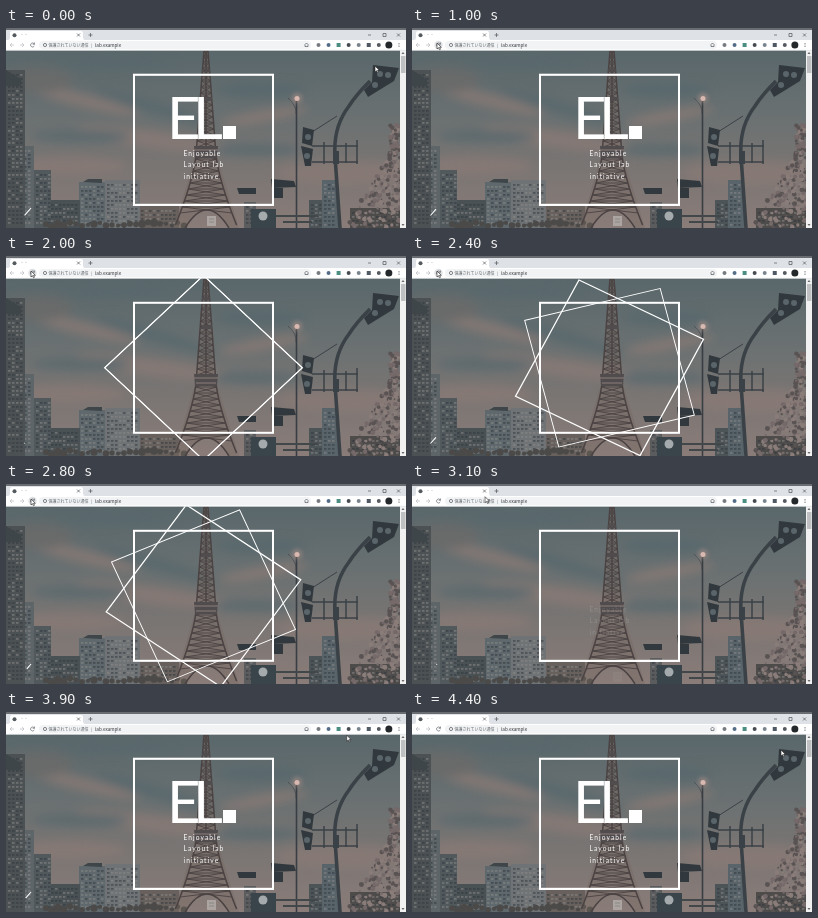
Recreate the animation shown at these times as an HTML page. Size 400x200 px, loop 4.5 s.

```html
<!DOCTYPE html>
<html lang="ja">
<head>
<meta charset="utf-8">
<title>Layout lab</title>
<style>
html, body { margin: 0; width: 100%; height: 100%; overflow: hidden; background: #6c7475; }
svg { display: block; width: 400px; height: 200px; }
.ui { font-family: "Noto Sans CJK JP", "Noto Sans", sans-serif; }
.title { font-family: Lato, "Open Sans", sans-serif; fill: #fff; }
</style>
</head>
<body>
<svg viewBox="0 0 400 200" xmlns="http://www.w3.org/2000/svg">
  <defs>
    <linearGradient id="sky" x1="0" y1="0" x2="0" y2="1">
      <stop offset="0" stop-color="#59676b"/>
      <stop offset=".35" stop-color="#697071"/>
      <stop offset=".65" stop-color="#797573"/>
      <stop offset="1" stop-color="#8a7c78"/>
    </linearGradient>
    <filter id="soft" x="-30%" y="-100%" width="160%" height="300%"><feGaussianBlur stdDeviation="5"/></filter>
    <filter id="glow" x="-100%" y="-100%" width="300%" height="300%"><feGaussianBlur stdDeviation="2"/></filter>
    <clipPath id="view"><rect y="22" width="394" height="178"/></clipPath>
  </defs>

  <g clip-path="url(#view)">
    <rect y="22" width="394" height="178" fill="url(#sky)"/>
    <g filter="url(#soft)" fill="#8a7a76" opacity=".75">
      <ellipse cx="75" cy="72" rx="60" ry="7" transform="rotate(14 75 72)"/>
      <ellipse cx="150" cy="112" rx="80" ry="9" transform="rotate(8 150 112)"/>
      <ellipse cx="258" cy="88" rx="45" ry="6" transform="rotate(-10 258 88)"/>
      <ellipse cx="60" cy="138" rx="60" ry="9"/>
      <ellipse cx="340" cy="145" rx="70" ry="12"/>
      <g fill="#56686d">
        <ellipse cx="150" cy="80" rx="65" ry="7" transform="rotate(16 150 80)"/>
        <ellipse cx="255" cy="62" rx="45" ry="8"/>
        <ellipse cx="75" cy="108" rx="50" ry="6"/>
        <ellipse cx="250" cy="122" rx="45" ry="6"/>
        <ellipse cx="110" cy="36" rx="60" ry="4"/>
      </g>
      <ellipse cx="30" cy="52" rx="38" ry="13" fill="#6c6a69"/>
    </g>
    <g id="city"></g>
    <g id="tower" fill="none" stroke="#4b4343"></g>

    <!-- street lamp -->
    <g fill="none" stroke="#383e43">
      <path d="M290.500 72V200" stroke-width="1.600"/>
      <path d="M290 86Q291 78 282 70" stroke-width=".6"/>
    </g>
    <circle cx="291" cy="70" r="5" fill="#b8958d" opacity=".5" filter="url(#glow)"/>
    <circle cx="291" cy="70.500" r="2.500" fill="#d9b8af"/>

    <g id="trees"></g>

    <!-- traffic lights -->
    <g fill="none" stroke="#3b4247">
      <path d="M334 200L329 128Q327 99 343 78Q350 67 364 53" stroke-width="3.600"/>
      <path d="M306 118H352M306 134H352M351 112V136M318 114V136M340 115V135" stroke-width="1.500"/>
      <path d="M306 104L331 88" stroke-width="1"/>
      <path d="M330 123V136" stroke-width="6"/>
    </g>
    <g fill="#32393e">
      <path d="M297 99L308 102L306 118L296 115Z"/>
      <path d="M295 118L307 121L305 138L299 138Z"/>
      <path d="M367 37L393 40L388 53L362 69L358 62L366 54Z"/>
      <path d="M231 160H250V166H233ZM265 151L288 153L290 159L266 160ZM267 160H277V170H267Z"/>
    </g>
    <g fill="#59656a">
      <circle cx="302" cy="109" r="3"/><circle cx="301" cy="128" r="3"/>
      <circle cx="374" cy="46" r="3"/><circle cx="382" cy="47" r="3"/><circle cx="369" cy="57" r="3"/>
    </g>
    <rect x="245" y="181" width="25" height="19" fill="#39444b"/>
    <circle cx="257" cy="188" r="4.500" fill="#a5aaac"/>
    <path d="M270 188H312M277 194H306" stroke="#42474a" stroke-width="2"/>

    <!-- hero -->
    <g fill="none" stroke="#fff">
      <rect x="128" y="46.800" width="139" height="130" stroke-width="2"/>
      <g transform="translate(197.500 111.800) scale(1.070 1)">
        <rect id="outer" x="-65.300" y="-65.300" width="130.600" height="130.600" stroke-width="1.200"/>
        <rect id="inner" x="-65.300" y="-65.300" width="130.600" height="130.600" stroke-width=".9"/>
      </g>
      <path id="dash" stroke-width="1.100"/>
    </g>
    <g id="letters" class="title">
      <text x="161" y="111" font-size="58">E</text>
      <text x="187" y="111" font-size="58">L</text>
      <rect x="217" y="98" width="13" height="13"/>
    </g>
    <g id="tagline" class="title" font-size="6.600" letter-spacing="1.100">
      <text x="177.500" y="127.500">Enjoyable</text>
      <text x="177.500" y="139">Layout lab</text>
      <text x="177.500" y="150.500">initiative</text>
    </g>
    <g id="scroll">
      <rect x="201" y="188" width="9" height="10" fill="#b9b2ae" opacity=".75"/>
      <path d="M203 191H208M203 194H208" stroke="#82807e" stroke-width=".8"/>
    </g>
  </g>

  <!-- browser -->
  <rect x="394" y="22" width="6" height="178" fill="#f1f1f1"/>
  <rect x="395" y="28" width="4.500" height="17" fill="#bfc0c1"/>
  <path d="M395.500 26L397 24L398.500 26ZM395.500 196L397 198L398.500 196Z" fill="#666"/>
  <rect width="400" height="12" fill="#dee1e6"/>
  <rect width="400" height="2" fill="#696c70"/>
  <path d="M2 12Q4 12 4 9V5Q4 3 6 3H75Q77 3 77 5V9Q77 12 79 12Z" fill="#fff"/>
  <rect y="12" width="400" height="10.500" fill="#fff"/>
  <path d="M0 22.300H400" stroke="#d5d7da" stroke-width=".6"/>
  <rect x="33" y="13" width="272" height="8" rx="4" fill="#f1f3f4"/>
  <circle cx="8.500" cy="7.300" r="2" fill="#555a5f"/>
  <g class="ui" font-size="4" fill="#5f6368">
    <text x="14" y="8.500">・・</text>
    <text x="42.500" y="18.800">保護されていない通信</text>
    <text x="85" y="18.800">|</text>
    <text x="89" y="18.900" font-size="4.600" fill="#303338">lab.example</text>
  </g>
  <g fill="none" stroke="#54585c" stroke-width=".7">
    <path d="M71 5.500L74 8.500M74 5.500L71 8.500M82.500 7H86.500M84.500 5V9"/>
    <path d="M362 7H365M377 5.500H380V8.500H377ZM391 5.500L394 8.500M394 5.500L391 8.500"/>
    <path d="M8 17H4M6 15L4 17L6 19M14 17H18M16 15L18 17L16 19" stroke="#b9bcc0"/>
    <circle cx="39" cy="17" r="1.600"/>
    <path d="M299 18.500V16.500L300.500 15L302 16.500V18.500Z"/>
  </g>
  <circle id="hover" cx="26.500" cy="17" r="4.200" fill="#dfe1e4"/>
  <path id="reload" d="M28.300 16A2 2 0 1 0 28.300 18M28.500 14.500V16.300H26.700" fill="none" stroke="#777b80" stroke-width=".8"/>
  <path id="stop" d="M25 15.500L28 18.500M28 15.500L25 18.500" stroke="#55595e" stroke-width=".8"/>
  <g id="tools"></g>
  <path id="cursor" d="M0 0V6L1.500 4.700L2.500 6.800L3.500 6.300L2.500 4.300H4.300Z" fill="#fff" stroke="#222" stroke-width=".6"/>
</svg>

<script>
const LOOP = 4.5, RELOADED = 1.9;
const $ = id => document.getElementById(id);
const clamp = v => Math.max(0, Math.min(1, v));
const ramp = (t, from, to) => clamp((t - from) / (to - from));
const easeInOut = p => (1 - Math.cos(Math.PI * p)) / 2;
const show = (id, opacity) => $(id).setAttribute('opacity', opacity);

let seed = 7;
const random = () => (seed = seed * 16807 % 2147483647) / 2147483647;

function drawCity() {
  // x, top, width, wall colour
  const blocks = [
    [303, 172, 14, '#4c5458'], [316, 152, 16, '#58646a'], [238, 174, 12, '#5b5c5e'],
    [133, 178, 40, '#67605d'], [73, 154, 27, '#5f686c'], [99, 152, 35, '#6f7375'],
    [43, 172, 31, '#4a5154'], [28, 142, 17, '#51595d'], [16, 118, 12, '#5e6568'],
    [0, 42, 19, '#4c5154'], [344, 180, 50, '#4e4b4b']
  ];
  let out = '';
  for (const [x, top, width, wall] of blocks) {
    out += `<rect x="${x}" y="${top}" width="${width}" height="${200 - top}" fill="${wall}"/>`;
    for (let y = top + 4; y < 198; y += 4)
      for (let wx = x + 2; wx < x + width - 2; wx += 4)
        out += `<rect x="${wx}" y="${y}" width="2.500" height="1.800" fill="${random() < .6 ? '#32393e' : '#8a8987'}" opacity=".55"/>`;
  }
  out += '<path d="M0 58V42L15 51V58ZM77 154L82 151H96V155Z" fill="#3f464a"/>';
  for (let i = 0; i < 24; i++)
    out += `<circle cx="${40 + i * 6}" cy="${199 - random() * 5}" r="${2 + random() * 2}" fill="#4b4a48"/>`;
  $('city').innerHTML = out;
}

function drawTower() {
  const half = y => y < 50 ? 2 + (y - 23) * .08 : y < 125 ? 4.2 + (y - 50) * .075 : 9.8 + 22 * ((y - 125) / 75) ** 1.4;
  let left = '', right = '', lattice = '';
  for (let y = 23; y <= 200; y += 6) {
    const a = half(y), b = half(y + 6);
    left += `${left ? 'L' : 'M'}${200 - a} ${y}`;
    right += `${right ? 'L' : 'M'}${200 + a} ${y}`;
    if (y < 180)
      lattice += `M${200 - a} ${y}L${200 + b} ${y + 6}M${200 + a} ${y}L${200 - b} ${y + 6}M${200 - a} ${y}H${200 + a}`;
  }
  $('tower').innerHTML = `
    <path d="M198 23H202L204 50L210 125L233 200H222Q201 164 180 200H168L190 125L196 50Z" fill="#75675f" stroke="none" opacity=".4"/>
    <path d="${lattice}" stroke-width=".9"/>
    <path d="${left}${right}" stroke-width="1.500"/>
    <path d="M200 23V118" stroke-width="1.500"/>
    <path d="M188 118H212L211 130H189ZM195 69H206V73H195ZM196 41H204V44H196Z" fill="#504b4c" stroke="none"/>
    <path d="M188 122H212M190 127H210" stroke="#8a7f7a"/>
    <path d="M179 200Q201 164 223 200" stroke-width="1.500"/>`;
}

function drawTrees() {
  const leaves = ['#595353', '#75696a', '#8a7d79'];
  let out = '';
  for (let i = 0; i < 260; i++) {
    const y = 97 + random() * 103, spread = 10 + Math.max(0, y - 125) * .6;
    out += `<circle cx="${394 - random() * spread}" cy="${y}" r="${.8 + random() * 1.7}" fill="${leaves[i % 3]}"/>`;
  }
  $('trees').innerHTML = out;
}

function drawTools() {
  const colors = ['#777b80', '#536c87', '#4c8d82', '#454b50', '#79848d', '#4e5964', '#555a60', '#24282b'];
  $('tools').innerHTML = colors.map((color, i) => {
    const x = 312.5 + i * 10.05;
    return i % 3 === 2 ? `<rect x="${x - 2}" y="15" width="4" height="4" fill="${color}"/>`
      : `<circle cx="${x}" cy="17" r="${i === 7 ? 3.5 : 2}" fill="${color}"/>`;
  }).join('') + '<path d="M393 15V19" stroke="#5f6368" stroke-dasharray=".8"/>';
}

// time, x, y
const pointerPath = [
  [0, 369, 38], [.2, 369, 38], [.6, 331, 9], [1, 25, 15], [2.95, 25, 15],
  [3.5, 300, 2], [3.65, 300, 2], [4.1, 369, 38], [LOOP, 369, 38]
];

function pointerAt(t) {
  const i = pointerPath.findIndex(stop => stop[0] > t);
  const [t0, x0, y0] = pointerPath[i - 1], [t1, x1, y1] = pointerPath[i];
  const p = easeInOut(ramp(t, t0, t1));
  return [x0 + (x1 - x0) * p, y0 + (y1 - y0) * p];
}

function render(t) {
  const fresh = t >= RELOADED;
  // Both frames appear as a diamond, then turn upright at different speeds.
  const turned = fresh ? easeInOut(ramp(t, 2.09, 3.07)) : 1;
  $('outer').setAttribute('transform', `rotate(${45 + 315 * turned})`);
  $('inner').setAttribute('transform', `rotate(${45 + 135 * turned})`);

  show('letters', fresh ? ramp(t, 3.2, 3.8) : 1);
  show('tagline', fresh ? ramp(t, 3.05, 3.4) : 1);
  show('scroll', fresh ? ramp(t, 3.05, 3.4) : 1);

  const phase = ((t - (fresh ? 1.95 : -.66) + 1.2) % 1.2) / 1.2;
  const head = clamp(phase * 2.2), tail = clamp(phase * 2.2 - 1.2);
  const point = p => `${18.5 + 6.5 * p} ${187.5 - 7.5 * p}`;
  $('dash').setAttribute('d', `M${point(tail)}L${point(head)}`);

  const [x, y] = pointerAt(t);
  $('cursor').setAttribute('transform', `translate(${x} ${y})`);
  const loading = t >= 1.3 && t < RELOADED;
  show('hover', t >= .95 && t < 3 ? 1 : 0);
  show('reload', loading ? 0 : 1);
  show('stop', loading ? 1 : 0);
}

drawCity();
drawTower();
drawTrees();
drawTools();

const started = performance.now();
function tick() {
  render((performance.now() - started) / 1000 % LOOP);
  requestAnimationFrame(tick);
}
tick();
</script>
</body>
</html>
```
